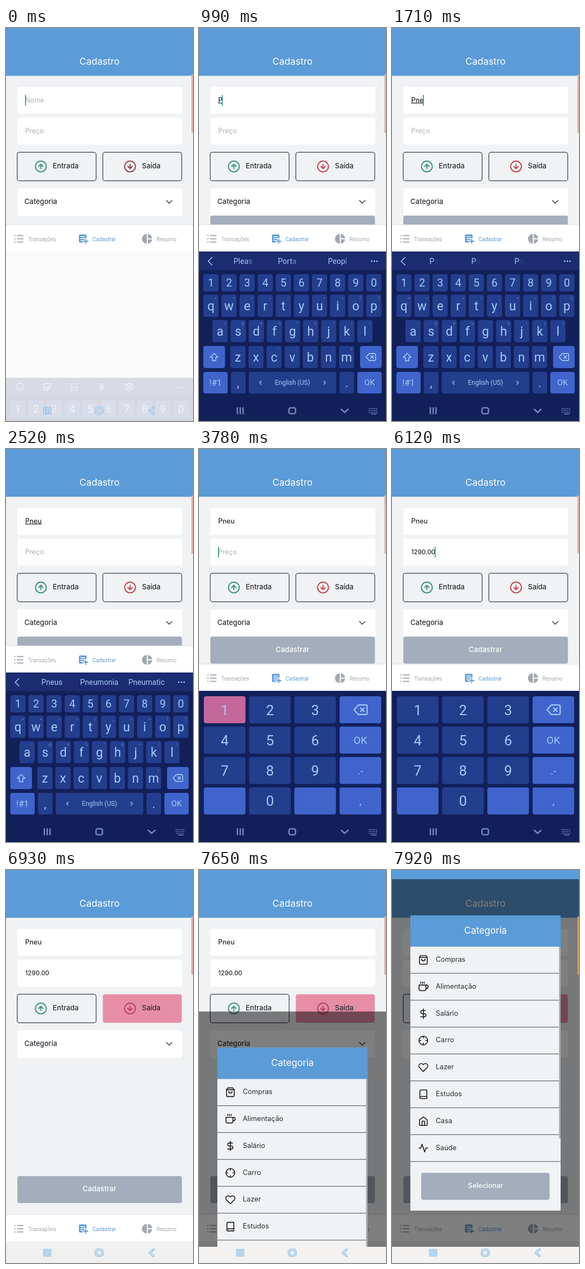
Write an HTML page that moves like this. It is 346 px wide and 728 px high and loops after 8 s.

```html
<!DOCTYPE html>
<html lang="pt">
<head>
<meta charset="utf-8">
<style>
html, body { margin: 0; height: 100%; overflow: hidden; background: #f0f2f4; }
svg { display: block; width: 100vw; height: 100vh; font-family: Inter, sans-serif; }
.kb { font-family: Roboto, sans-serif; }
</style>
</head>
<body>
<svg id="stage" viewBox="0 0 346 728"></svg>
<script>
const LOOP = 8000, STEP = 90;
const BLUE = '#5b9bd7', GRAY = '#a3adbb', INK = '#2b2b33';
const KEY = '#243e8e', SPECIAL = '#3f64cb', PRESSED = '#c4689b', GLYPH = '#a6c9f6', PAD = '#12205a';

// [time, key]: the key lights up for one step, then its character appears
const presses = [[720, 'p'], [1170, 'n'], [1530, 'e'], [2160, 'u'], [2790, 'OK'],
  [3780, '1'], [4140, '2'], [4500, '9'], [4770, '0'], [5040, '.-'], [5400, '0'], [5580, '0']];
const cursorOff = [[360, 720], [1890, 1980], [2520, 2790], [6210, LOOP]];
const hints = [[], ['Please', 'Portable', 'People'], ['Png', 'Pneuma', 'Pneumo'],
  ['Pneu', 'Pneuma', 'Pneumatic'], ['Pneus', 'Pneumonia', 'Pneumatic']];

const up = 'M16 12l-4-4-4 4M12 16V8', down = 'M8 12l4 4 4-4M12 8v8';
const ring = 'M2 12a10 10 0 1 0 20 0a10 10 0 1 0-20 0';
const categories = [
  ['Compras', 'M6 2L3 6v14a2 2 0 0 0 2 2h14a2 2 0 0 0 2-2V6l-3-4zM3 6h18M16 10a4 4 0 0 1-8 0'],
  ['Alimentação', 'M18 8h1a4 4 0 0 1 0 8h-1M2 8h16v9a4 4 0 0 1-4 4H6a4 4 0 0 1-4-4zM6 1v3M10 1v3M14 1v3'],
  ['Salário', 'M12 1v22M17 5H9.5a3.5 3.5 0 0 0 0 7h5a3.5 3.5 0 0 1 0 7H6'],
  ['Carro', ring + 'M22 12h-4M6 12H2M12 6V2M12 22v-4'],
  ['Lazer', 'M20.8 4.6a5.5 5.5 0 0 0-7.8 0L12 5.7l-1-1.1a5.5 5.5 0 0 0-7.8 7.8L12 21.2l8.8-8.8a5.5 5.5 0 0 0 0-7.8z'],
  ['Estudos', 'M4 19.5A2.5 2.5 0 0 1 6.5 17H20M6.5 2H20v20H6.5A2.5 2.5 0 0 1 4 19.5v-15A2.5 2.5 0 0 1 6.5 2z'],
  ['Casa', 'M3 9l9-7 9 7v11a2 2 0 0 1-2 2H5a2 2 0 0 1-2-2zM9 22V12h6v10'],
  ['Saúde', 'M22 12h-4l-3 9L9 3l-3 9H2']
];

const stage = document.getElementById('stage');
const pen = document.createElement('canvas').getContext('2d');

const rect = (x, y, w, h, fill, r = 0, more = '') =>
  `<rect x="${x}" y="${y}" width="${w}" height="${h}" rx="${r}" fill="${fill}" ${more}/>`;
const text = (s, x, y, size, fill, more = '') =>
  `<text x="${x}" y="${y}" font-size="${size}" fill="${fill}" ${more}>${s}</text>`;
const mid = (s, x, y, size, fill, more = '') => text(s, x, y, size, fill, 'text-anchor="middle" ' + more);
const line = (d, stroke, w = 1.5, more = '') =>
  `<path d="${d}" fill="none" stroke="${stroke}" stroke-width="${w}" stroke-linecap="round" stroke-linejoin="round" ${more}/>`;
const icon = (d, x, y, scale, stroke) =>
  line(d, stroke, 2, `transform="translate(${x} ${y}) scale(${scale}) translate(-12 -12)"`);
const clamp = v => Math.max(0, Math.min(1, v));
const esc = s => s.replace(/&/g, '&amp;').replace(/</g, '&lt;');

function field(y, value, placeholder, size, focused, t, underline) {
  let s = rect(21, y, 305, 50, '#fff', 4);
  s += value
    ? text(value, 35.5, y + 28.5, size, INK, `font-weight="500" ${underline ? 'text-decoration="underline"' : ''}`)
    : text(placeholder, 35.5, y + 28.5, 12.5, '#b0b0b4');
  if (focused && !cursorOff.some(([a, b]) => t >= a && t < b)) {
    pen.font = `500 ${size}px Inter, sans-serif`;
    s += rect(35.3 + pen.measureText(value).width - (value ? 1 : 0), y + 15, 1.7, 20, '#33998a');
  }
  return s;
}

function choice(x, iconX, label, arrow, color, filled) {
  return rect(x, 230.3, 146, 52.7, filled ? '#e68ea8' : 'none', 4,
      filled ? '' : 'stroke="#5a5a63" stroke-width="1.5"') +
    icon(ring + arrow, iconX, 256.5, 1, color) +
    text(label, iconX + 22, 260, 13, INK, 'font-weight="500"');
}

function tabs(y) {
  const c = y + 26.5, pale = '#a2a7b0';
  let s = rect(0, y, 346, 50, '#fff') + rect(0, y, 346, 1, '#dfe2e6');
  for (const d of [-6, 0, 6]) s += line(`M16 ${c + d}h1M21 ${c + d}h10.5`, pale, 1.8);
  s += rect(135, c - 8, 14, 15, BLUE, 2) +
    line(`M138 ${c - 4}h8M138 ${c - .5}h8M138 ${c + 3}h4`, '#fff', 1.4) +
    line(`M147.5 ${c + .5}v8M143.5 ${c + 4.5}h8`, '#fff', 4.5) +
    line(`M147.5 ${c + .5}v8M143.5 ${c + 4.5}h8`, BLUE, 1.8);
  s += `<path fill="${pale}" d="M260.5 ${c - 9}a9 9 0 0 0 0 18zM262.5 ${c - 9}v8h8a9 9 0 0 0-8-8zM262.5 ${c + 1}v8a9 9 0 0 0 8-8z"/>`;
  return s + `<g class="kb">${text('Transações', 41, c + 4, 10, pale)}${
    text('Cadastrar', 160, c + 4, 10, BLUE)}${text('Resumo', 278.5, c + 4, 10, pale)}</g>`;
}

// solid marks over the dark keyboard, hollow blue ones over a light bar
function nav(open) {
  const marks = 'M71 703.5v11M76.3 703.5v11M81.5 703.5v11' +
    'M169.5 703.5h6a3 3 0 0 1 3 3v5a3 3 0 0 1-3 3h-6a3 3 0 0 1-3-3v-5a3 3 0 0 1 3-3z';
  if (!open) {
    const d = marks + 'M273 703l-7 6 7 6';
    return line(d, '#86bce8', 4.2) + line(d, '#d3e5f5', 1.8);
  }
  const color = '#7285bb';
  let s = line(marks, color, 2.6) + line('M263.5 706.5l6 5.5 6-5.5', color, 2.8);
  for (const y of [705, 708.5, 712]) s += line(`M315 ${y}h17`, color, 1.8, 'stroke-dasharray="0.2 3.2"');
  return s + line('M319 715h9', color, 1.4);
}

const backspace = (x, y, k) => icon('M21 4H8l-7 8 7 8h13a2 2 0 0 0 2-2V6a2 2 0 0 0-2-2zM18 9l-6 6M12 9l6 6', x, y, k, GLYPH);

function toolIcons() {
  return icon(ring + 'M8 14s1.5 2 4 2 4-2 4-2M9 9v.1M15 9v.1', 26, 431, .7, GLYPH) +
    icon('M3 7a4 4 0 0 1 4-4h10a4 4 0 0 1 4 4v6l-8 8H7a4 4 0 0 1-4-4zM13 21v-4a4 4 0 0 1 4-4h4M8 8v.1M14 8v.1M7 12q3 3 6 1', 76, 431, .7, GLYPH) +
    icon('M3 3h18v18H3z', 126, 431, .65, GLYPH) + mid('GIF', 126, 433.5, 6.5, GLYPH) +
    icon('M12 2a3 3 0 0 0-3 3v7a3 3 0 0 0 6 0V5a3 3 0 0 0-3-3zM5 11a7 7 0 0 0 14 0M12 18v4', 177, 431, .65, GLYPH) +
    icon('M9 2h6l1 4 4-1 2 5-3 2 3 3-3 5-4-2-1 4H9l-1-4-4 1-2-5 3-2-3-3 3-5 3 2zM9 12a3 3 0 1 0 6 0a3 3 0 1 0-6 0', 228, 431, .7, GLYPH);
}

function suggestions(count, age) {
  const reveal = (age / 84) ** 2;
  return line('M24 425l-7 7 7 7', GLYPH, 1.6) + hints[count].map((word, i) =>
    mid([...word].map((c, n) => `<tspan fill-opacity="${clamp(reveal - n)}">${c}</tspan>`).join(''),
      85 + i * 87.5, 437, 14, GLYPH)).join('');
}

function letters(lit, count, age) {
  const key = (id, x, y, w, h, label, size, fill = KEY) =>
    rect(x, y, w, h, lit === id ? PRESSED : fill, 4) + mid(label, x + w / 2, y + h / 2 + size * .36, size, GLYPH);
  let s = rect(0, 414, 346, 314, PAD) + rect(0, 414, 346, 34.5, '#1c2c70');
  s += count ? suggestions(count, age) : toolIcons();
  for (const x of [319.5, 324.5, 329.5]) s += `<circle cx="${x}" cy="432" r="1.4" fill="${GLYPH}"/>`;
  const rows = [['1234567890', 8, 456, 32, ''], ['qwertyuiop', 8, 494, 41, '+×÷=/_<>[]'],
    ['asdfghjkl', 25, 541, 41, '!@#%^&*()'], ['zxcvbnm', 58, 589, 41, '-\'":;,?']];
  for (const [chars, x0, y, h, alt] of rows) [...chars].forEach((c, i) => {
    const x = x0 + i * 33.5;
    s += key(c, x, y, 28, h, count ? c : c.toUpperCase(), alt ? 23 : 20);
    if (alt) s += mid(esc(alt[i]), x + 23, y + 9, 7, GLYPH, 'opacity=".5"');
  });
  s += rect(8, 589, 40, 41, SPECIAL, 4) + icon('M12 3l9 9h-5v8H8v-8H3z', 28, 610, .8, GLYPH);
  s += rect(298, 589, 40, 41, SPECIAL, 4) + backspace(318, 609.5, .8);
  s += key('sym', 8, 637, 45, 40, '!#1', 16, SPECIAL) + key(',', 59, 637, 27, 40, ',', 22) +
    key('space', 92, 637, 162, 40, 'English (US)', 12) + key('.', 260, 637, 27, 40, '.', 22) +
    key('OK', 293, 637, 45, 40, 'OK', 15, SPECIAL);
  return s + line('M115 654l-3 3 3 3M231 654l3 3-3 3', GLYPH, 1.3);
}

function numbers(lit) {
  const labels = ['1', '2', '3', '', '4', '5', '6', 'OK', '7', '8', '9', '.-', '', '0', '', ','];
  let s = rect(0, 448, 346, 280, PAD);
  labels.forEach((label, i) => {
    const x = 9 + (i % 4) * 83.7, y = 458 + (i >> 2) * 56.3;
    const digit = label >= '0' && label <= '9';
    s += rect(x, y, 77, 50, label && lit === label ? PRESSED : digit ? KEY : SPECIAL, 4) +
      mid(label, x + 38.5, y + (digit ? 34.5 : 32), digit ? 26 : 19, GLYPH);
  });
  return s + backspace(299, 483, 1.1);
}

function modal(t) {
  const p = clamp((t - 7470) / 450);
  if (p <= 0) return '';
  const shift = 681 * (1 - p) ** 2;
  let s = rect(0, 17, 346, 712, '#000', 0, 'opacity=".5"') + rect(34, 84, 278, 547, '#f0f2f4') +
    rect(34, 84, 278, 58, BLUE) + mid('Categoria', 173, 118, 17.2, '#fff');
  categories.forEach(([name, d], i) => {
    const y = 166.5 + i * 49.8;
    s += icon(d, 58, y, .8, '#17171c') + text(name, 81, y + 3.5, 12.8, INK) +
      rect(34, y + 24.3, 278, 1.2, '#64656a');
  });
  s += rect(309, 142, 3, 355, '#abacae') + rect(54, 561, 237.5, 50, GRAY, 4) +
    mid('Selecionar', 173, 589, 12.8, '#fff', 'font-weight="500"');
  return `<g transform="translate(0 ${shift})">${s}</g>` + rect(0, 698, 346, 30, '#f3f2f0');
}

function draw(t) {
  const typed = presses.filter(([at]) => t >= at + STEP);
  const nameKeys = typed.slice(0, 4);
  const name = nameKeys.map(([, k], i) => i ? k : k.toUpperCase()).join('');
  const price = typed.slice(5).map(([, k]) => k[0]).join('');
  const lit = (presses.find(([at]) => t >= at && t < at + STEP) || [])[1];
  const age = nameKeys.length ? t - nameKeys[nameKeys.length - 1][0] - STEP : 0;
  const numeric = t >= 3240, closed = t >= 6660;
  const tabY = closed ? 638 : numeric ? 398 : 364;
  const onName = t < 2880;

  let s = rect(0, 0, 346, 728, '#f0f2f4') + rect(0, 0, 346, 88.5, BLUE) +
    mid('Cadastro', 173, 67.5, 17.4, '#fff');
  s += field(109, name, 'Nome', 12.5, onName, t, onName) +
    field(166, price, 'Preço', 11.6, !onName && !closed, t) +
    choice(20.7, 64.5, 'Entrada', up, '#369382') +
    choice(179.2, 229.5, 'Saída', down, closed ? '#b83e61' : t ? '#c7434f' : '#8b4549', closed);
  s += rect(21, 297, 305, 51, '#fff', 4) + text('Categoria', 34, 325.5, 13, INK, 'font-weight="500"') +
    line('M297 319.5l5 5 5-5', '#45454d', 1.7);
  if (t) {
    const y = closed ? 567 : 347.5;
    s += rect(21, y, 304.5, 50, GRAY, 4) + mid('Cadastrar', 173, y + 28, 13.3, '#fff', 'font-weight="500"');
  }
  s += rect(0, tabY, 346, 364, '#fafafa') + tabs(tabY);
  if (closed) s += rect(0, 688, 346, 40, '#f0f0f0');
  s += modal(t) + rect(343, 86, 3, 108, t >= 7920 ? '#d39a5c' : t >= 6930 ? '#e8a5a6' : '#e5b2a4');

  // keyboard rises and turns opaque at the start, sinks and fades at the end
  const shown = t < 180 ? [.15, .65][t / STEP] : 1 - clamp((t - 6570) / 360);
  if (shown > 0) {
    const shift = t < 180 ? [234, 80][t / STEP] : 250 * (1 - shown);
    const keys = numeric ? numbers(lit) : letters(lit, nameKeys.length, age);
    s += `<g class="kb" opacity="${shown}" transform="translate(0 ${shift})">${keys}</g>`;
  }
  stage.innerHTML = s + nav(shown === 1);
}

let last = -1;
function tick(now) {
  const t = Math.floor(now % LOOP / STEP) * STEP;
  if (t !== last) draw(last = t);
  requestAnimationFrame(tick);
}
draw(0);
requestAnimationFrame(tick);
</script>
</body>
</html>
```
